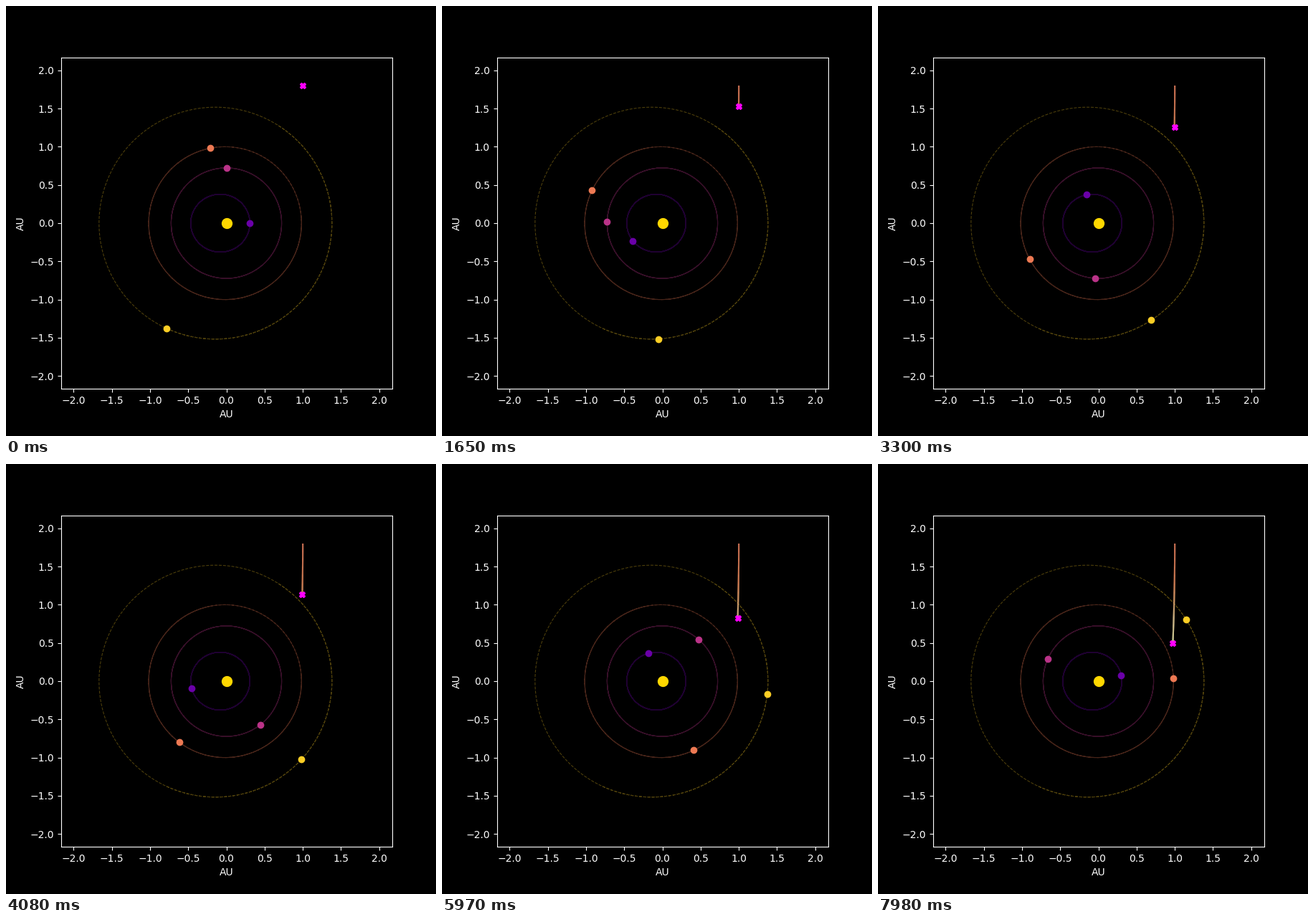
Write a matplotlib script that moves like this. It is 600x600 px and loops after 8000 ms.

```python
import numpy as np
import matplotlib.pyplot as plt
from matplotlib.animation import FuncAnimation
from matplotlib.collections import LineCollection
from matplotlib.colors import LinearSegmentedColormap

FRAMES = 267          # one simulated day per frame
LOOP_MS = 8000
TRACE_DAYS = 1000
EARTH_RATE = 0.9856   # mean motion, degrees per day

# semi-major axis (AU), eccentricity, mean anomaly at day 0 (degrees)
PLANETS = [
    (0.387, 0.2056, 0),
    (0.723, 0.0, 90),
    (1.000, 0.0167, 100),
    (1.524, 0.0934, 250),
]
COLORS = plt.cm.plasma(np.linspace(0.2, 0.9, len(PLANETS)))
LIMIT = 1.3 * 1.524 * 1.0934


def kepler(a, e, m0, day):
    """Position on an ellipse with the sun in one focus."""
    m = np.radians(m0 + EARTH_RATE / a ** 1.5 * np.asarray(day, float))
    ecc = m
    for _ in range(20):
        ecc = m + e * np.sin(ecc)
    return a * (np.cos(ecc) - e), a * np.sqrt(1 - e * e) * np.sin(ecc)


def comet(day):
    day = np.asarray(day, float)
    return 1 - 0.0255 * (day / 266) ** 2, 1.8 - 0.0049 * day


plt.style.use("dark_background")
fig, ax = plt.subplots(figsize=(6, 6), dpi=100, facecolor="black")
ax.set_facecolor("black")
ax.set_aspect("equal")
ax.set_xlim(-LIMIT, LIMIT)
ax.set_ylim(-LIMIT, LIMIT)
ax.set_xlabel("AU")
ax.set_ylabel("AU")

days = np.arange(TRACE_DAYS)
dots = []
for planet, color in zip(PLANETS, COLORS):
    ax.plot(*kepler(*planet, days), "--", color=color, lw=0.8, alpha=0.3)
    dots.append(ax.plot([], [], "o", color=color, ms=6, zorder=4)[0])
ax.plot(0, 0, "o", color="gold", ms=10, zorder=3)

# Segments overlap by one day so the trail has no seams.
path = np.column_stack(comet(np.arange(FRAMES)))
trail_map = LinearSegmentedColormap.from_list("trail", [
    (0.0, "#c46c50"), (0.4, "#c87850"), (0.6, "#c89664"),
    (0.75, "#c8af82"), (1.0, "#cdcd96"),
])
trail_colors = trail_map(np.linspace(0, 1, FRAMES))
trail = LineCollection([], linewidths=1.5, zorder=5)
trail.set_snap(False)
ax.add_collection(trail, autolim=False)
head, = ax.plot([], [], "X", color="magenta", ms=6, zorder=6)


def update(day):
    for dot, planet in zip(dots, PLANETS):
        x, y = kepler(*planet, day)
        dot.set_data([x], [y])
    trail.set_segments([path[max(i - 1, 0):i + 2] for i in range(day)])
    trail.set_color(trail_colors[:max(day, 1)])
    head.set_data(path[day:day + 1, 0], path[day:day + 1, 1])
    return [*dots, trail, head]


anim = FuncAnimation(fig, update, frames=FRAMES, interval=LOOP_MS / FRAMES,
                     repeat=True, repeat_delay=0, blit=False)
plt.show()
```
